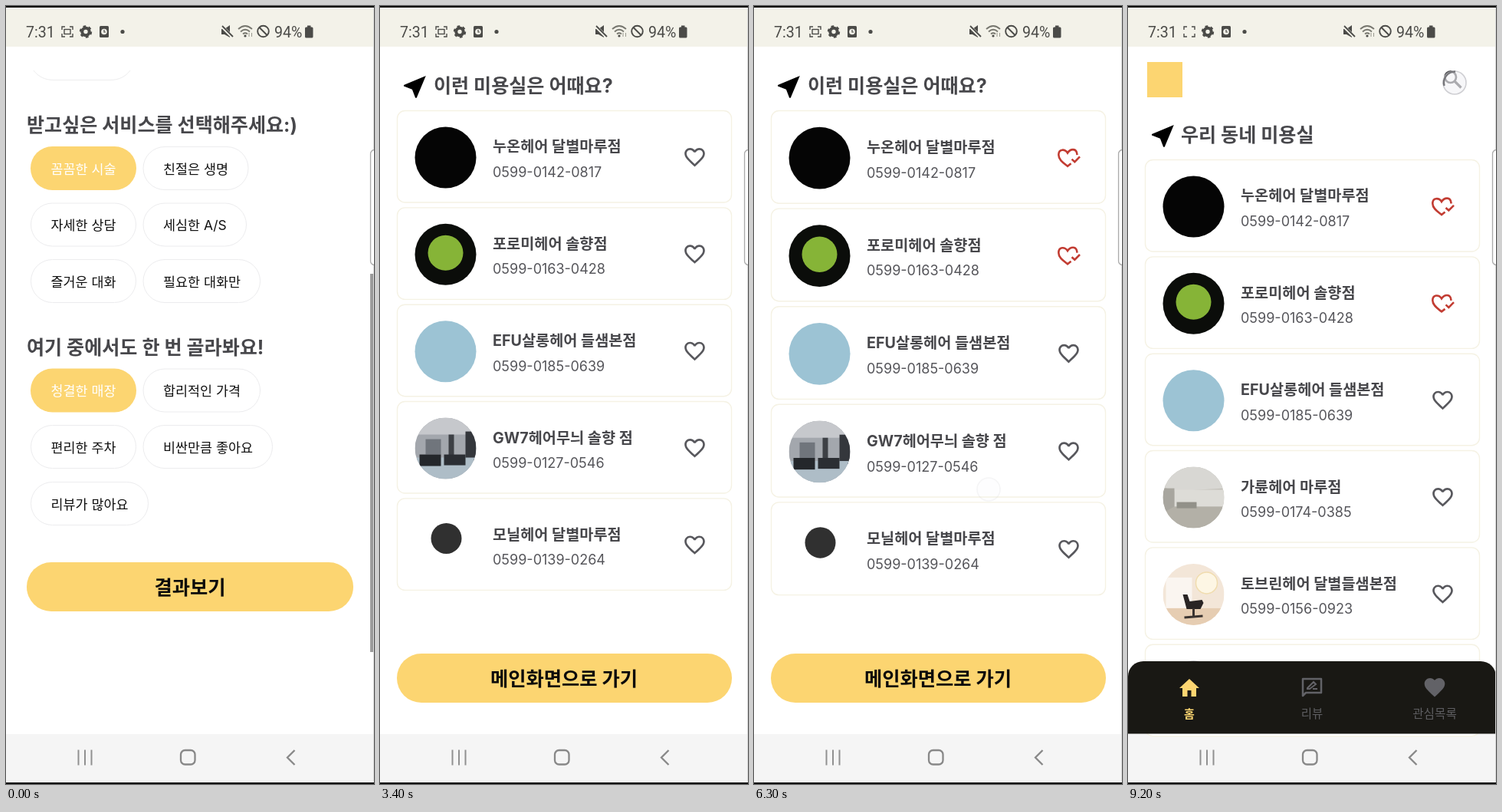
Animation, 480 px wide and 1014 px high, one loop 9300 ms. Source, as an HTML page:

```html
<!DOCTYPE html>
<html lang="ko">
<head>
<meta charset="utf-8">
<style>
html, body { margin: 0; width: 100%; height: 100%; overflow: hidden; background: #fff; }
svg { display: block; width: 100vw; height: 100vh; }
text { font-family: Inter, 'Noto Sans CJK KR', 'Noto Sans CJK', 'Noto Sans CJK JP', sans-serif; white-space: pre; }
.status { font-family: Roboto, sans-serif; }
</style>
</head>
<body>
<svg id="stage" viewBox="0 0 480 1014" preserveAspectRatio="none"></svg>
<script>
const LOOP = 9300;
const YELLOW = '#fcd571', INK = '#47474b', CREAM = '#f3f2e9', DARK = '#191814';

const HEART = 'M16.5 3c-1.74 0-3.41.81-4.5 2.09C10.91 3.81 9.24 3 7.5 3 4.42 3 2 5.42 2 8.5c0 3.78 3.4 6.86 8.55 11.54L12 21.35l1.45-1.32C18.6 15.36 22 12.28 22 8.5 22 5.42 19.58 3 16.5 3z';
const ARROW = 'M21 3L3 10.53v.98l6.84 2.65L12.48 21h.98L21 3z';

// Text is placed by the vertical middle of its glyphs.
function label(str, x, middle, size, weight, fill, anchor = 'start') {
  return `<text x="${x}" y="${middle + size * 0.38}" font-size="${size}" font-weight="${weight}" fill="${fill}" text-anchor="${anchor}">${str}</text>`;
}
const rect = (x, y, w, h, fill, extra = '') =>
  `<rect x="${x}" y="${y}" width="${w}" height="${h}" fill="${fill}" ${extra}/>`;
const circle = (x, y, r, fill, extra = '') =>
  `<circle cx="${x}" cy="${y}" r="${r}" fill="${fill}" ${extra}/>`;
const line = (d, color, width, extra = '') =>
  `<path d="${d}" fill="none" stroke="${color}" stroke-width="${width}" ${extra}/>`;
const title = (str, x, y) => label(str, x, y, 25.1, 700, INK);
const page = () => rect(0, 2, 480, 51, CREAM) + rect(0, 53, 480, 896, '#fff');

function button(str, x, y, w) {
  return rect(x, y, w, 64, YELLOW, 'rx="32"') + label(str, 240, y + 32, 25.3, 700, '#0b0b0b', 'middle');
}

function chip(str, x, y, w, on) {
  const box = on ? rect(x, y, w, 57, YELLOW, 'rx="28.5"')
    : rect(x + .5, y + .5, w - 1, 56, '#fff', 'rx="28" stroke="#ececee"');
  return box + label(str, x + 26.5, y + 29, 17.4, 400, on ? '#fff' : '#111');
}

// Avatars are drawn around their own centre.
const photo = inner => `<g clip-path="url(#round)">${inner}</g>`;
const avatars = {
  black: circle(0, 0, 40, '#050505'),
  night: circle(0, 0, 40, '#0b0d0a') + circle(0, -2, 23, '#86b437'),
  blue: circle(0, 0, 40, '#9cc3d4'),
  mono: circle(1, -9, 20, '#303030'),
  lounge: photo(rect(-40, -40, 80, 80, '#a3a7ad') + rect(-40, -40, 80, 22, '#c6c8cc') +
    rect(-26, -12, 20, 20, '#70757c') + rect(4, -18, 7, 28, '#3d4045') + rect(26, -22, 14, 38, '#34373c') +
    rect(-40, 12, 80, 28, '#aebdc7') + rect(-34, 8, 28, 15, '#24272b') + rect(-2, 8, 28, 14, '#2b2e33')),
  studio: photo(rect(-40, -40, 80, 80, '#c4c2bb') + '<path d="M-40-40H40V-12L-25-8L-40-14Z" fill="#d8d7d3"/>' +
    rect(-25, -10, 65, 22, '#dddcd7') + rect(-40, -12, 15, 30, '#a8a69f') +
    '<path d="M-25 12H40V40H-40V20Z" fill="#b3b0a7"/>' + rect(-22, 6, 26, 8, '#929189')),
  bright: photo(rect(-40, -40, 80, 80, '#f3e6d8') + rect(-36, -22, 34, 40, '#faf5f0') +
    circle(17, -15, 14, '#fdf6e4', 'stroke="#f0dcae" stroke-width="1.5"') + rect(-40, 18, 80, 22, '#e6cdb2') +
    '<path d="M-14 0h6l3 9 16-2 2 4-4 8h-18Z" fill="#292424"/>' + line('M0 18V28M-12 30L12 28', '#3a3330', 3))
};

const shops = {
  a: ['누온헤어 달별마루점', '0599-0142-0817', 'black'],
  b: ['포로미헤어 솔향점', '0599-0163-0428', 'night'],
  c: ['EFU살롱헤어 들샘본점', '0599-0185-0639', 'blue'],
  d: ['GW7헤어무늬 솔향 점', '0599-0127-0546', 'lounge'],
  e: ['모닐헤어 달별마루점', '0599-0139-0264', 'mono'],
  f: ['가륜헤어 마루점', '0599-0174-0385', 'studio'],
  g: ['토브린헤어 달별들샘본점', '0599-0156-0923', 'bright']
};

const emptyHeart = `<g class="empty" transform="translate(394.5 45) scale(1.333)"><path d="${HEART}M12 18.7C7.14 14.24 4 11.39 4 8.5 4 6.5 5.5 5 7.5 5c1.54 0 3.04.99 3.57 2.36h1.87C13.46 5.99 14.96 5 16.5 5c2 0 3.5 1.5 3.5 3.5 0 2.89-3.14 5.74-8 10.2z" fill="#58585d" fill-rule="evenodd"/></g>`;
const likedHeart = `<g class="liked">${line('M421.5 57.5C421 48 412.5 49.5 409 55C405.5 49.5 397.3 49.5 397.3 57.5C397.3 64 404 68 409 72L413.5 68.5M414.5 63L418.3 66.5L425 59.8', '#c23c32', 2.6)}</g>`;

function card(key, index, top, liked) {
  const [name, phone, face] = shops[key];
  const heart = liked === undefined ? emptyHeart + likedHeart : liked ? likedHeart : emptyHeart;
  return `<g class="card" transform="translate(0 ${top + index * 126.35})">` +
    rect(22.5, .5, 436, 119.5, '#fff', 'rx="10" stroke="#f5f2e4" stroke-width="1.4"') +
    `<g transform="translate(85.5 61.5)">${avatars[face]}</g>` +
    label(name, 147, 47, 19.7, 700, INK) + label(phone, 147, 80, 18, 400, '#55555a') + heart + '</g>';
}

const form = page() +
  line('M36 84C42 92 51 96.5 62 96.5H136C147 96.5 156 92 162 84', '#ededee', 1) +
  title('받고싶은 서비스를 선택해주세요:)', 27, 154) +
  chip('꼼꼼한 시술', 32, 183, 138, true) + chip('친절은 생명', 178.5, 183, 138) +
  chip('자세한 상담', 32, 256.5, 138) + chip('세심한 A/S', 178.5, 256.5, 135.5) +
  chip('즐거운 대화', 32, 330, 138) + chip('필요한 대화만', 178.5, 330, 153.5) +
  title('여기 중에서도 한 번 골라봐요!', 27, 444) +
  chip('청결한 매장', 32, 472.5, 138, true) + chip('합리적인 가격', 178.5, 472.5, 153.5) +
  chip('편리한 주차', 32, 546, 138) + chip('비싼만큼 좋아요', 178.5, 546, 169.5) +
  chip('리뷰가 많아요', 32, 620, 154) +
  button('결과보기', 27, 725, 426) + rect(475, 349, 5, 493, '#9b9b9b');

const loading = page() + '<path id="spinner" fill="none" stroke="#55555c" stroke-width="8.5"/>' +
  label('추천할 미용실을 고르고 있어요', 234, 546, 25, 700, INK, 'middle');

const pointer = y => `<path d="${ARROW}" transform="translate(26.2 ${y}) scale(1.6)"/>`;

const list = page() + pointer(86.2) + title('이런 미용실은 어때요?', 70, 103) +
  `<g id="cards">${['a', 'b', 'c', 'd', 'e'].map((k, i) => card(k, i, 136, i < 2 ? undefined : false)).join('')}</g>` +
  button('메인화면으로 가기', 22, 844, 437);

const search = circle(420.7, 92.7, 7.3, 'none', 'stroke="#58585c" stroke-width="2.7"') +
  line('M426 98L434.5 106.5', '#58585c', 3.2);
const tabs =
  `<path d="M0 948.5V874A20 20 0 0 1 20 854H460A20 20 0 0 1 480 874V948.5Z" fill="${DARK}"/>` +
  `<path d="M80 877L67 889H71V900H77.5V892H82.5V900H89V889H93Z" fill="${YELLOW}"/>` +
  line('M228 899V877H252V895H232Z', '#626267', 2.5, 'stroke-linejoin="round"') +
  line('M234 889L242 881L245 884L237 890H234ZM241 890H247', '#626267', 2) +
  `<path d="${HEART}" transform="translate(384 872) scale(1.333)" fill="#626267"/>` +
  label('홈', 80, 922, 15, 700, YELLOW, 'middle') +
  label('리뷰', 240, 922, 15.5, 400, '#5d5d60', 'middle') +
  label('관심목록', 400, 922, 15.7, 400, '#5d5d60', 'middle');

const home = page() + rect(0, 948.5, 480, 65.5, '#f5f5f5') +
  rect(25, 73, 46, 46, YELLOW) + search + pointer(150.2) + title('우리 동네 미용실', 69, 167) +
  ['a', 'b', 'c', 'f', 'g', 'd'].map((k, i) => card(k, i, 200, i < 2)).join('') + tabs;

const G = '#4b4b48';
const statusText = (str, x) => `<text class="status" x="${x}" y="40.5" font-size="19.6" fill="${G}">${str}</text>`;
const statusBar = statusText('7:31', 26) +
  line('M73 31V27H77M83 27H87V31M87 36V40H83M77 40H73V36', G, 1.4) +
  `<g id="recorder">${rect(76, 30.5, 8, 6, 'none', `stroke="${G}" stroke-width="1.4"`)}</g>` +
  circle(104, 33.5, 4.7, 'none', `stroke="${G}" stroke-width="4"`) +
  circle(104, 33.5, 7, 'none', `stroke="${G}" stroke-width="2.4" stroke-dasharray="3.7 3.63"`) +
  rect(122, 26, 12, 15, G, 'rx="1.5"') + circle(128, 33.5, 3.8, CREAM) + line('M128 31V34H130', G, 1.2) +
  circle(152, 33.5, 2.6, G) +
  `<path d="M281 30H285L292 25V41L285 37H281Z" fill="${G}"/>` +
  line('M281 26L295 40', CREAM, 4) + line('M282 26L296 40', G, 1.8) +
  line('M303 30Q312 22 321 30M306 33.5Q312 28 318 33.5M309 36.5Q312 34 315 36.5', '#77776f', 1.8) +
  circle(312, 39, 1.6, G) + line('M317 40V35M320.5 35V40', '#99998f', 1) +
  circle(335.5, 33, 7.3, 'none', `stroke="${G}" stroke-width="1.9"`) + line('M330.5 28L340.5 38', G, 1.9) +
  statusText('94%', 350) +
  rect(390, 27.5, 10.5, 14, G, 'rx="1.5"') + rect(393, 25.5, 4.5, 3, G);

const systemNav =
  line('M94.5 969.5V989.5M103 969.5V989.5M111.5 969.5V989.5', '#919191', 2) +
  rect(228, 970, 18.5, 18.5, 'none', 'rx="5.5" stroke="#888" stroke-width="2.3"') +
  line('M376.5 970L367 979.5L376.5 989', '#888', 2.3);

const layer = (id, body) => `<g id="${id}">${body}</g>`;
const svg = document.getElementById('stage');
svg.innerHTML = `<defs><clipPath id="round">${circle(0, 0, 40, '#000')}</clipPath></defs>` +
  rect(0, 0, 480, 1014, '#fff') + rect(0, 948.5, 480, 65.5, '#f5f5f5') +
  layer('form', form) + layer('loading', loading) + layer('list', list) +
  layer('dim', rect(0, 2, 480, 1010, '#201020', 'opacity=".07"')) + layer('home', home) +
  statusBar + systemNav +
  line('M479.5 2V1012', '#d5d5d5', 1) +
  rect(475.5, 187.5, 12, 150, '#fff', 'rx="5" stroke="#aaa" stroke-width="1.3"') +
  layer('touch', circle(0, 0, 15, '#f1f1f4', 'fill-opacity=".55" stroke="#cfcfd3" stroke-width="1.6"')) +
  layer('glint', line('M412.5 104A14.5 14.5 0 0 1 427 85.5', '#77777b', 2.4)) +
  rect(0, 0, 480, 2, '#000') + rect(0, 1012, 480, 2, '#000');

const el = id => document.getElementById(id);
const clamp = v => Math.max(0, Math.min(1, v));
const ramp = (t, from, to) => clamp((t - from) / (to - from));
const smooth = v => v * v * (3 - 2 * v);
const show = (node, on) => node.setAttribute('visibility', on ? 'inherit' : 'hidden');
const fade = (node, v) => node.setAttribute('opacity', v);
const cards = [...el('cards').children];

// Each touch: start, end, x, y, strength.
const SEARCH_TAP = 9100;
const touches = [
  [250, 500, 244, 758, 1],
  [4250, 4480, 413, 198, 1],
  [5020, 5280, 414, 321, 1],
  [5900, 6380, 306, 630, .2],
  [7300, 7520, 250, 877, 1],
  [SEARCH_TAP, LOOP, 426, 100, 1]
];

function drawSpinner(t) {
  const turns = (t - 2000) / 1333, whole = Math.floor(turns), part = turns - whole;
  const base = 250 * whole + 180 * turns;
  const tail = 75.5 + base + 250 * smooth(clamp(part * 2 - 1));
  const head = 93.5 + base + 250 * smooth(clamp(part * 2));
  const at = deg => {
    const a = deg * Math.PI / 180;
    return `${234 + 48.5 * Math.cos(a)} ${466 + 48.5 * Math.sin(a)}`;
  };
  el('spinner').setAttribute('d', `M${at(tail)}A48.5 48.5 0 ${head - tail > 180 ? 1 : 0} 1 ${at(head)}`);
}

function render(t) {
  show(el('form'), t < 800);
  show(el('loading'), t >= 600 && t < 3350);
  fade(el('loading'), ramp(t, 600, 800));
  show(el('list'), t >= 3150 && t < 8300);
  fade(el('list'), ramp(t, 3150, 3300));
  drawSpinner(t);

  [4480, 5280].forEach((likedAt, i) => {
    show(cards[i].querySelector('.empty'), t < likedAt);
    show(cards[i].querySelector('.liked'), t >= likedAt);
    fade(cards[i], t >= likedAt - 250 && t < likedAt ? .8 : 1);
  });

  const stretch = 1 + .02 * smooth(ramp(t, 5950, 6120)) * (1 - smooth(ramp(t, 6120, 6480)));
  el('cards').setAttribute('transform', `translate(0 136) scale(1 ${stretch}) translate(0 -136)`);

  const slide = 988 * Math.pow(1 - ramp(t, 7700, 8200), 4.5);
  show(el('dim'), t >= 7700 && t < 8200);
  show(el('home'), t >= 7700);
  el('home').setAttribute('transform', `translate(0 ${slide})`);

  const press = touches.find(([from, to]) => t >= from && t < to);
  show(el('touch'), !!press);
  if (press) {
    el('touch').setAttribute('transform', `translate(${press[2]} ${press[3]})`);
    fade(el('touch'), press[4]);
  }
  show(el('glint'), t >= SEARCH_TAP);
  show(el('recorder'), t % (LOOP / 9) < 515);
}

const start = performance.now();
function tick() {
  render((performance.now() - start) % LOOP);
  requestAnimationFrame(tick);
}
tick();
</script>
</body>
</html>
```
